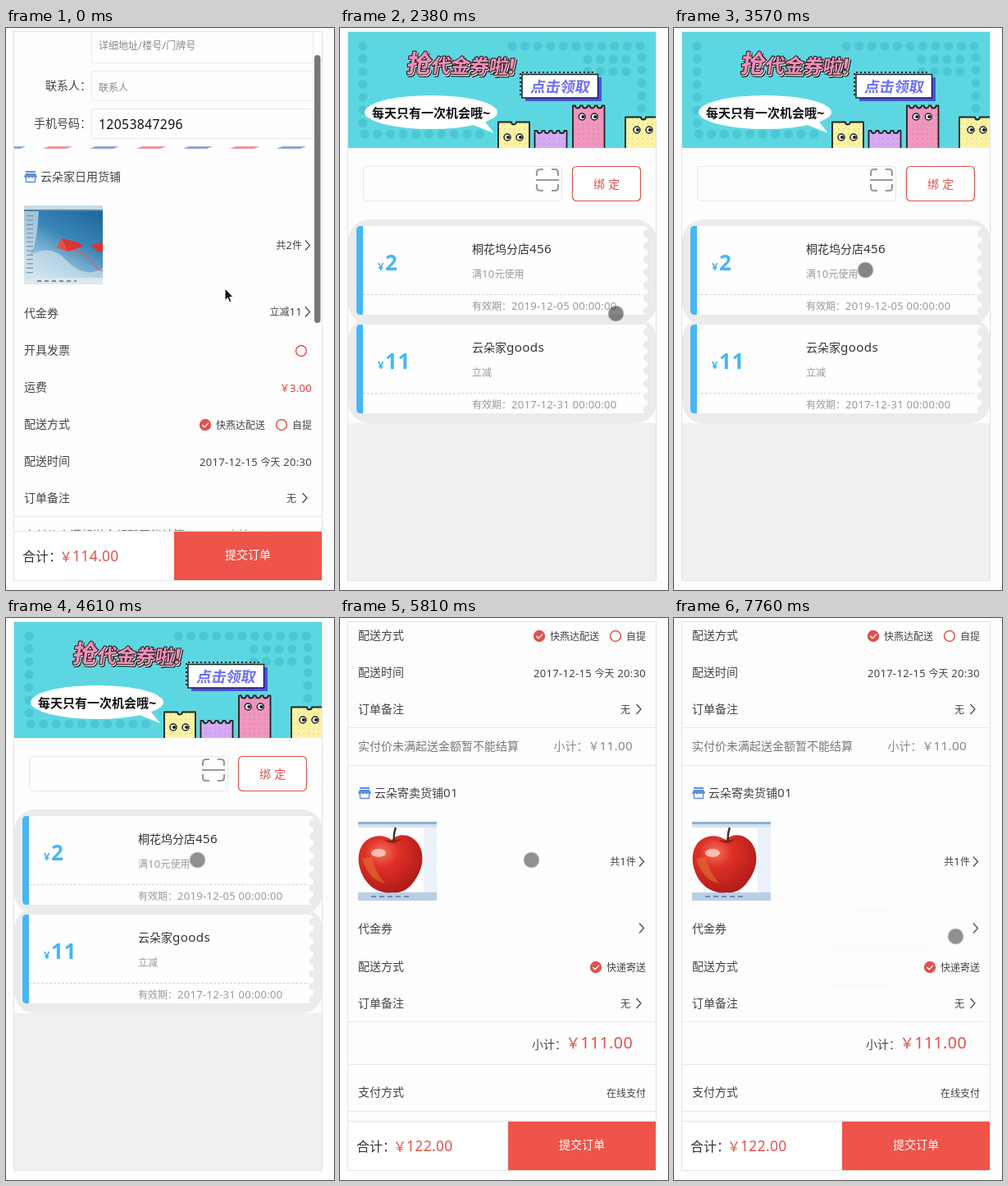
An HTML page that plays this animation: 400 by 684 pixels, repeating every 8 s.

```html
<!DOCTYPE html>
<html lang="zh-CN">
<head>
<meta charset="utf-8">
<style>
html, body { margin: 0; width: 100%; height: 100%; overflow: hidden; background: #fdfdfd; }
svg { display: block; width: 400px; height: 684px; }
text { font-family: "Noto Sans CJK SC", "Noto Sans CJK JP", "Noto Sans CJK", sans-serif; }
.latin { font-family: "Noto Sans", "Open Sans", sans-serif; font-size: 1.09em; letter-spacing: .02em; }
</style>
</head>
<body>
<svg id="stage" viewBox="0 0 400 684" xmlns="http://www.w3.org/2000/svg">
  <defs>
    <clipPath id="view"><rect x="10" y="5" width="375" height="607"/></clipPath>
    <clipPath id="screen"><rect x="10" y="5" width="375" height="667"/></clipPath>
    <clipPath id="banner"><rect x="10" y="5" width="375" height="141"/></clipPath>
    <clipPath id="photo"><rect x="22" y="265" width="96" height="96"/></clipPath>
    <pattern id="grain" width="6" height="6" patternUnits="userSpaceOnUse"><circle cx="3" cy="3" r=".8" opacity=".16"/></pattern>
    <linearGradient id="sky" x1=".9" y1="0" x2=".4" y2="1">
      <stop offset="0" stop-color="#1c6399"/><stop offset=".45" stop-color="#3a86b8"/><stop offset="1" stop-color="#c3dfec"/>
    </linearGradient>
    <radialGradient id="skin" cx=".36" cy=".3" r=".75">
      <stop offset="0" stop-color="#f4715a"/><stop offset=".35" stop-color="#de3027"/><stop offset="1" stop-color="#ad1a18"/>
    </radialGradient>
  </defs>
</svg>
<script>
const LOOP = 8000, INK = '#444', RED = '#e0524c', PAPER = '#fdfdfd';
const stage = document.getElementById('stage');

function add(parent, tag, attrs = {}) {
  const node = document.createElementNS(stage.namespaceURI, tag);
  for (const key in attrs) node.setAttribute(key, attrs[key]);
  return parent.appendChild(node);
}
const group = (parent, attrs) => add(parent, 'g', attrs);
const path = (parent, d, attrs) => add(parent, 'path', { d, fill: 'none', ...attrs });
const box = (parent, x, y, width, height, fill, attrs) => add(parent, 'rect', { x, y, width, height, fill, ...attrs });
const dot = (parent, cx, cy, r, fill, attrs) => add(parent, 'circle', { cx, cy, r, fill, ...attrs });

// y is the optical middle of the line
function label(parent, x, y, str, size = 14, fill = INK, attrs) {
  const node = add(parent, 'text', { x, y: y + size * .38, 'font-size': size, fill, ...attrs });
  for (const run of str.match(/[\x20-\x7e\u00a5]+|[^\x20-\x7e\u00a5]+/g)) {
    const span = add(node, 'tspan', run.charCodeAt(0) < 256 ? { class: 'latin' } : {});
    span.textContent = run;
  }
  return node;
}
const right = (parent, x, y, str, size = 12, fill = INK) => label(parent, x, y, str, size, fill, { 'text-anchor': 'end' });

// rows of [ms, value], each value held until the next
function play(node, prop, rows) {
  const frames = rows.map(([ms, v]) => ({ offset: ms / LOOP, [prop]: v, easing: 'step-end' }));
  frames.push({ offset: 1, [prop]: rows[rows.length - 1][1] });
  node.animate(frames, { duration: LOOP, iterations: Infinity });
}
const show = (node, from, to) => play(node, 'opacity', [
  ...(from > 0 ? [[0, 0]] : []), [from, 1], ...(to < LOOP ? [[to, 0]] : [])]);
const shift = (x, y) => `translate(${x}px, ${y}px)`;
const glide = (times, a, b) => times.map((ms, i) => {
  const p = (1 - Math.cos(Math.PI * (i + 1) / times.length)) / 2;
  return [ms, shift(a[0] + (b[0] - a[0]) * p, a[1] + (b[1] - a[1]) * p)];
});

function chevron(g, x, y) {
  path(g, `M${x} ${y - 6}l5.5 6l-5.5 6`, { stroke: INK, 'stroke-width': 1.2 });
}
function radio(g, x, y, on) {
  if (!on) return dot(g, x, y, 6.4, '#fff', { stroke: RED, 'stroke-width': 1.5 });
  dot(g, x, y, 7.2, RED);
  path(g, `M${x - 3.7} ${y}l2.8 2.8l5-5.2`, { stroke: '#fff', 'stroke-width': 1.3 });
}
function line(g, y, fill = '#e6e6e6') { box(g, 10, y, 375, 1, fill); }
function field(g, y, h) {
  box(g, 104.5, y + .5, 270, h, '#fefefe', { rx: 2, stroke: '#e9e9e9' });
}
function stripe(g, y, h, x) {
  for (let k = 0; k < 8; k++)
    path(g, `M${x + 57 * k} ${y + h}l7 ${-h}h29l-7 ${h}z`, { fill: k % 2 ? '#ee9498' : '#8fa6d3' });
}
function store(g, y, name) {
  path(g, `M24 ${y - 7}h12v2h-12zM24 ${y - 4}h12l2 4q-2 3-4 0q-2 3-4 0q-2 3-4 0q-2 3-4 0z`, { fill: '#5b8fdc' });
  path(g, `M24.5 ${y + 1}v5.5h11v-5.5`, { stroke: '#5b8fdc', 'stroke-width': 1.3 });
  label(g, 42, y, name);
}

box(stage, 0, 0, 400, 684, PAPER);

// Checkout page
const checkout = group(stage), view = group(checkout, { 'clip-path': 'url(#view)' });
const hair = group(view);
box(hair, 10, 196, 375, 12, '#f1f1f1');
for (const y of [246, 373, 419, 464, 509, 554, 599]) line(hair, y, '#eee');

const mask = box(view, 10, 5, 375, 608, PAPER);
play(mask, 'opacity', [[0, 1], [450, 0], [5810, 1]]);
const sideMask = path(view, 'M10 5H264V359H385V613H10z', { fill: PAPER });
show(sideMask, 0, 5210);
const faint = path(view, 'M223 356.5h42M192 402.5h118M192 447.5h73', { stroke: '#f5f5f5' });
show(faint, 7160, LOOP);

const page = group(view);
stripe(page, 5, 4, -6);
label(page, 20, 29, '收货地址：');
label(page, 104, 29, '云州市-望溪区-松月雅庭', 12);
field(page, 50, 41);
label(page, 113, 70, '详细地址/楼号/门牌号', 12, '#888');
label(page, 48, 119, '联系人：');
field(page, 101, 36);
label(page, 113, 121, '联系人', 12, '#888');
label(page, 34, 165, '手机号码：');
field(page, 147, 36);
label(page, 113, 166, '12053847296', 14.5, '#111');
stripe(page, 193, 3, -12);
store(page, 230, '云朵家日用货铺');

const kites = group(page, { 'clip-path': 'url(#photo)' });
box(kites, 22, 265, 96, 96, 'url(#sky)');
path(kites, 'M22 330q30-22 52 2t46 8v22H22z', { fill: '#d5e8f0', opacity: .6 });
box(kites, 22, 265, 96, 5, '#c9d9e4');
box(kites, 22, 270, 96, 2, '#4d86ad');
path(kites, 'M22 272h18q-2 30-6 44l-12 20z', { fill: '#dbe8ee', opacity: .65 });
path(kites, 'M29 277v74', { stroke: '#6f8796', 'stroke-width': 8, 'stroke-dasharray': '1.3 4', opacity: .8 });
path(kites, 'M80 319q18 4 25 15t13 10', { stroke: '#d66069', 'stroke-width': 1.3 });
path(kites, 'M68 305l21 5l5 5l-19 6l-13-5zM103 314l15-5v13l-6-1z', { fill: '#d93436' });
path(kites, 'M68 305l7 16l-13-5z', { fill: '#ed4d4a' });
box(kites, 22, 353, 96, 8, '#dbe7ee');
path(kites, 'M38 357h48', { stroke: '#6f90aa', 'stroke-width': 2, 'stroke-dasharray': '5 4' });
play(kites, 'opacity', [[0, 1], [5210, .35], [5360, 1]]);

right(page, 361, 313, '共2件');
chevron(page, 365, 313.5);
label(page, 22, 396, '代金券');
const before = group(page), after = group(page);
right(before, 361, 394, '立减11');
right(after, 361, 394, '满10减2');
chevron(page, 365, 394.5);
label(page, 22, 441, '开具发票');
radio(page, 360, 442);
label(page, 22, 486, '运费');
right(page, 373, 487, '￥3.00', 12, '#e03c36');

function ways(y) {
  label(page, 22, y, '配送方式');
}
function note(y) {
  label(page, 22, y, '订单备注');
  right(page, 354, y, '无');
  chevron(page, 361.5, y);
}
ways(531);
radio(page, 243, 532, true);
label(page, 256, 532, '快燕达配送', 12);
radio(page, 336, 532);
right(page, 373, 532, '自提');
label(page, 22, 576, '配送时间');
right(page, 373, 577, '2017-12-15 今天 20:30');
note(621);
for (const y of [643, 689, 1001, 1053, 1110]) line(page, y);
label(page, 22, 666, '实付价未满起送金额暂不能结算', 14, '#777');
right(before, 357, 666, '小计：￥3.00', 14, '#888');
right(after, 357, 666, '小计：￥11.00', 14, '#888');

store(page, 723, '云朵寄卖货铺01');
box(page, 22, 758, 96, 96, '#fff');
box(page, 22, 758, 96, 3, '#8fb2cd');
box(page, 22, 761, 96, 4, '#d3e2ef');
box(page, 102, 765, 16, 79, '#ebf0fb');
box(page, 22, 844, 96, 10, '#b9cfe6');
path(page, 'M38 849h50', { stroke: '#6d8fb3', 'stroke-width': 2, 'stroke-dasharray': '6 4' });
path(page, 'M63 780c9-9 23-7 31 3c9 11 8 28 1 40c-7 13-17 23-30 21c-12 2-26-3-34-15c-10-15-11-33-3-44c8-11 24-13 35-5z', { fill: 'url(#skin)' });
path(page, 'M27 803q8 26 28 30q-14-16-16-32z', { fill: '#e78a38', opacity: .45 });
add(page, 'ellipse', { cx: 47, cy: 796, rx: 9, ry: 5, fill: '#fbd5cb', opacity: .8 });
path(page, 'M54 780q10 8 21-1q-10 3-21 1z', { fill: '#8a2018' });
path(page, 'M66 783q-1-10 2-18', { stroke: '#4a3326', 'stroke-width': 2.5 });
right(page, 361, 806, '共1件');
chevron(page, 365, 806.5);
label(page, 22, 888, '代金券');
chevron(page, 365, 887.5);
ways(934);
radio(page, 312, 935, true);
right(page, 373, 935, '快递寄送');
note(979);
label(page, 234, 1029, '小计：');
right(page, 357, 1027, '￥111.00', 18, RED);
label(page, 22, 1087, '支付方式');
right(page, 373, 1088, '在线支付');

const scroll = [[0, shift(0, -49)], [5210, shift(0, 0)],
  ...[.18, .52, .84, 1].map((p, i) => [5360 + 150 * i, shift(0, -510 * p)])];
play(hair, 'transform', scroll);
play(page, 'transform', scroll);

box(checkout, 10, 613, 195, 59, '#fff');
line(checkout, 612);
box(checkout, 205, 613, 180, 59, '#ee5449');
label(checkout, 20, 643, '合计：', 16, '#333');
const totals = ['￥114.00', '￥122.00'].map(s => label(checkout, 65, 643, s, 16, RED));
label(checkout, 267, 641, '提交订单', 14, '#fff');
for (const node of [before, totals[0]]) show(node, 0, 5210);
for (const node of [after, totals[1]]) show(node, 5210, LOOP);

const bar = box(checkout, 376, 33, 7.5, 326, '#777', { rx: 3.7 });
play(bar, 'opacity', [[0, 1], [300, .75], [450, .4], [600, .15], [740, 0]]);

// Coupon page
const coupons = group(stage, { 'clip-path': 'url(#screen)' });
box(coupons, 10, 5, 375, 667, PAPER);
const banner = group(coupons, { 'clip-path': 'url(#banner)' });
box(banner, 10, 5, 375, 141, '#5cd7e1');
path(banner, 'M28 22V129H182M210 22H368V100M302 38H352M302 53H352', {
  stroke: '#4cc6d3', 'stroke-width': 11, 'stroke-linecap': 'round', 'stroke-dasharray': '0 15.6' });

const title = group(banner, { transform: 'translate(82 42.5) rotate(1) skewX(-8)' });
const bold = { 'font-weight': 900, 'stroke-linejoin': 'round', 'paint-order': 'stroke' };
for (const [d, fill, stroke, width] of [[2, '#222', '#222', 3], [1, '#fff', '#fff', 2.5], [0, '#f48fba', '#222', 2.2]]) {
  const look = { ...bold, stroke, 'stroke-width': width };
  label(title, d, d, '抢', 30, fill, look);
  label(title, 30 + d, 2 + d, '代金券啦!', 23.5, fill, look);
}

box(banner, 226, 60, 93, 29, '#4650ea');
path(banner, 'M220 82V54H309', { stroke: '#222', 'stroke-width': 2, 'stroke-dasharray': '2 3' });
box(banner, 222, 56.5, 92.5, 28.5, '#fff', { stroke: '#222', 'stroke-width': 1.5 });
label(banner, 0, 0, '点击领取', 18, '#6c70f2', { 'font-weight': 800, transform: 'translate(233 71) skewX(-10)' });

path(banner, 'M160 117L188 128L172 108z', { fill: '#fff' });
add(banner, 'ellipse', { cx: 111, cy: 102.5, rx: 81, ry: 20.5, fill: '#fff' });
label(banner, 39, 103.5, '每天只有一次机会哦~', 15, '#111', { 'font-weight': 900 });

function ticket(x, y, w, n, fill, eye) {
  const gap = (w - 6 * n) / (n + 1);
  const d = `M${x} 148V${y}${`h${gap}a3 3 0 0 0 6 0`.repeat(n)}h${gap}V148`;
  path(banner, d, { fill, stroke: '#222', 'stroke-width': 1.8, 'stroke-linejoin': 'round' });
  path(banner, d, { fill: 'url(#grain)' });
  for (const side of eye ? [-8, 7] : []) {
    dot(banner, x + w / 2 + side, eye, 4, '#fff', { stroke: '#222', 'stroke-width': 1.5 });
    dot(banner, x + w / 2 + side + 1, eye, 2, '#111');
  }
}
ticket(193, 114.5, 38, 1, '#fbf3a4', 133);
ticket(237.5, 125, 39, 4, '#d6aaf3');
ticket(284, 94.5, 38.5, 4, '#f196be', 108);
ticket(348, 108.5, 44, 1, '#fbf3a4', 124);

box(coupons, 28.5, 168.5, 242, 42, '#fefefe', { rx: 4, stroke: '#e6e6e6' });
path(coupons, 'M240 180v-4q0-4 4-4h4M258 172h4q4 0 4 4v4M266 190v4q0 4-4 4h-4M248 198h-4q-4 0-4-4v-4M239 185h28', {
  stroke: '#999', 'stroke-width': 2.2 });
box(coupons, 283.5, 168.5, 83, 42, '#fff', { rx: 5, stroke: RED, 'stroke-width': 1.2 });
label(coupons, 309, 190, '绑 定', 14, RED);

function coupon(dy, amount, name, rule, until) {
  const g = group(coupons, { transform: `translate(0 ${dy})` });
  box(g, 10, 233, 376, 128, '#ebebeb', { rx: 26 });
  box(g, 20, 241, 355, 108, '#fefefe', { rx: 5 });
  path(g, 'M28 241v108h-3q-5 0-5-5v-98q0-5 5-5z', { fill: '#45b6f7' });
  for (let k = 0; k < 7; k++) dot(g, 375, 250 + 15.7 * k, 5.2, '#ebebeb');
  path(g, 'M28 324.5H369', { stroke: '#d5d5d5', 'stroke-dasharray': '3 2' });
  label(g, 46, 290, '¥', 12, '#45b6f7', { 'font-weight': 700 });
  label(g, 55, 285.5, amount, 24, '#45b6f7', { 'font-weight': 600 });
  label(g, 161, 269, name, 14, '#333');
  label(g, 161, 299, rule, 12, '#999');
  label(g, 161, 338, '有效期：' + until + ' 00:00:00', 12, '#999');
}
coupon(0, '2', '桐花坞分店456', '满10元使用', '2019-12-05');
coupon(120, '11', '云朵家goods', '立减', '2017-12-31');
box(coupons, 10, 481, 375, 191, '#f0f0f0');
show(coupons, 2380, 5210);

box(stage, 9.5, 4.5, 376, 668, 'none', { stroke: '#e2e2e2' });

// Pointer
const arrow = path(stage, 'M267 317v14.5l3.3-3l2.3 5.2l2.4-1l-2.3-5.1h4.5z', { fill: '#111', stroke: '#fff', 'stroke-width': 1 });
show(arrow, 0, 150);
const touch = dot(stage, 0, 0, 10.1, '#222', { stroke: '#fff', 'stroke-width': 1.2 });
const start = [267, 317], open = [336.5, 347.5], pick = [233.5, 294.5];
const drift = [[238, 320], [255, 375], [252, 441], [201, 425], [240, 405], [300, 392], [325.5, 387.5], [343.5, 387.5]];
play(touch, 'transform', [
  [0, shift(...start)],
  ...glide([150, 300, 450, 600, 740, 880], start, open),
  ...glide([2830, 2980, 3130, 3270], open, pick),
  ...drift.map((p, i) => [6710 + 150 * i, shift(...p)])
]);
play(touch, 'opacity', [[0, 0], [150, .5], [1630, .55], [2830, .5], [3570, .55], [4610, .5]]);
</script>
</body>
</html>
```
